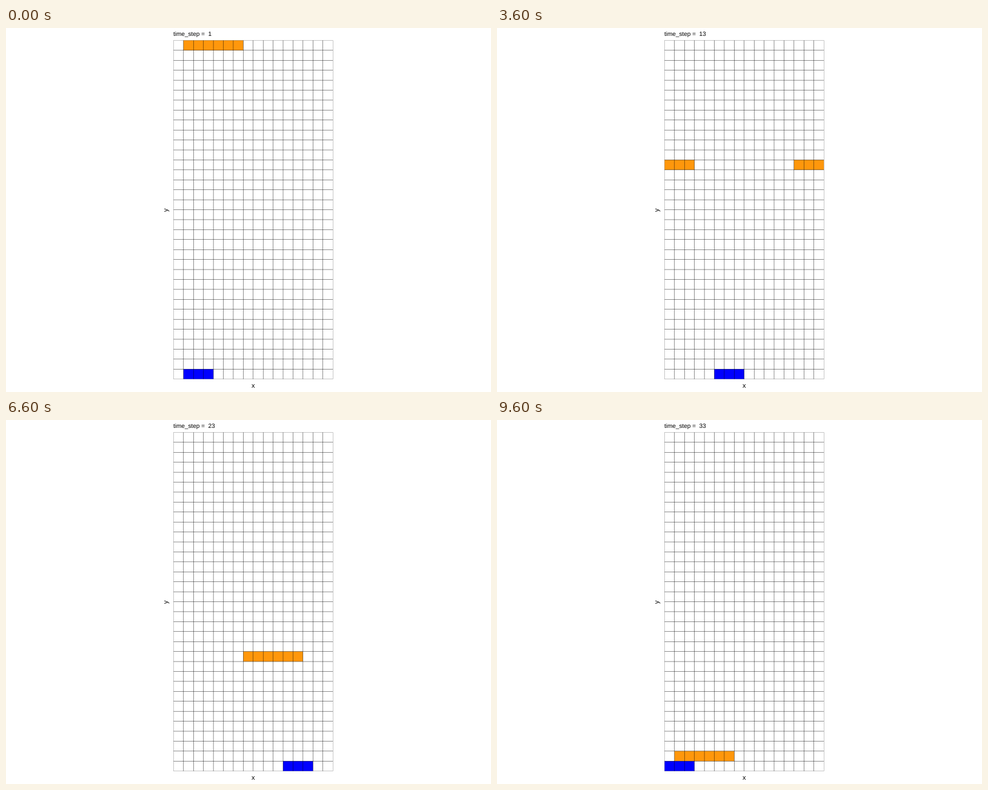
Recreate the animation shown at these times as a matplotlib script. Size 800 px wide and 600 px high, loop 9.9 s.

```python
import numpy as np
import matplotlib.pyplot as plt
from matplotlib.animation import FuncAnimation
from matplotlib.collections import LineCollection
from matplotlib.patches import Rectangle

DPI = 100
COLS, ROWS = 16, 34
CELL = 16.42
LEFT, TOP = 276.4, 20.4
RIGHT, BOTTOM = LEFT + COLS * CELL, TOP + ROWS * CELL
STEPS = 33
STEP_MS = 300
ORANGE, BLUE = "#ff970c", "#0000ff"

plt.rcParams["font.family"] = "Liberation Sans"
plt.rcParams["text.hinting"] = "none"
plt.rcParams["toolbar"] = "None"


def px(size):
    """Pixels to points."""
    return size * 72 / DPI


class Bar:
    """A row of cells that wraps around the sides of the grid."""

    def __init__(self, ax, size, color):
        self.size = size
        self.parts = [Rectangle((LEFT, TOP), 0, CELL, fc=color, lw=0,
                                snap=False, zorder=1) for _ in range(2)]
        for part in self.parts:
            ax.add_patch(part)

    def place(self, col, row):
        col %= COLS
        for part, start in zip(self.parts, (col, col - COLS)):
            first, last = max(start, 0), min(start + self.size, COLS)
            part.set_xy((LEFT + first * CELL, TOP + row * CELL))
            part.set_width(max(last - first, 0) * CELL)
            part.set_visible(last > first)


def add_lines(ax, segments, width):
    lines = LineCollection(segments, colors="black", linewidths=px(width),
                           capstyle="butt", zorder=2)
    lines.set_snap(False)
    ax.add_collection(lines, autolim=False)


def draw_grid(ax):
    vertical = [[(x, TOP), (x, BOTTOM)] for x in LEFT + CELL * np.arange(COLS + 1)]
    horizontal = [[(LEFT, y), (RIGHT, y)] for y in TOP + CELL * np.arange(ROWS + 1)]
    add_lines(ax, vertical[1:-1] + horizontal[1:-1], 0.44)
    add_lines(ax, [vertical[0], vertical[-1], horizontal[0], horizontal[-1]], 0.22)


def paddle_col(step):
    col = np.interp(step, [1, 4, 9, 16, 20, 26, 33], [1, 1, 3, 6, 9, 13, 16])
    return int(np.floor(col + 0.5))


fig = plt.figure(figsize=(800 / DPI, 600 / DPI), dpi=DPI, facecolor="white")
ax = fig.add_axes([0, 0, 1, 1])
ax.set_xlim(0, 800)
ax.set_ylim(600, 0)
ax.axis("off")

draw_grid(ax)
block = Bar(ax, 6, ORANGE)
paddle = Bar(ax, 3, BLUE)

title = ax.text(LEFT, 12.9, "", fontsize=px(10), va="baseline")
ax.text((LEFT + RIGHT) / 2, 592.6, "x", fontsize=px(11), ha="center", va="baseline")
ax.text(268.6, (TOP + BOTTOM) / 2, "y", fontsize=px(11), rotation=90,
        rotation_mode="anchor", ha="center", va="baseline")


def update(i):
    step = i + 1
    title.set_text(f"time_step =  {step}")
    block.place(step, i)
    paddle.place(paddle_col(step), ROWS - 1)
    return [title, *block.parts, *paddle.parts]


anim = FuncAnimation(fig, update, frames=STEPS, interval=STEP_MS,
                     repeat=True, repeat_delay=0, blit=False)
plt.show()
```
